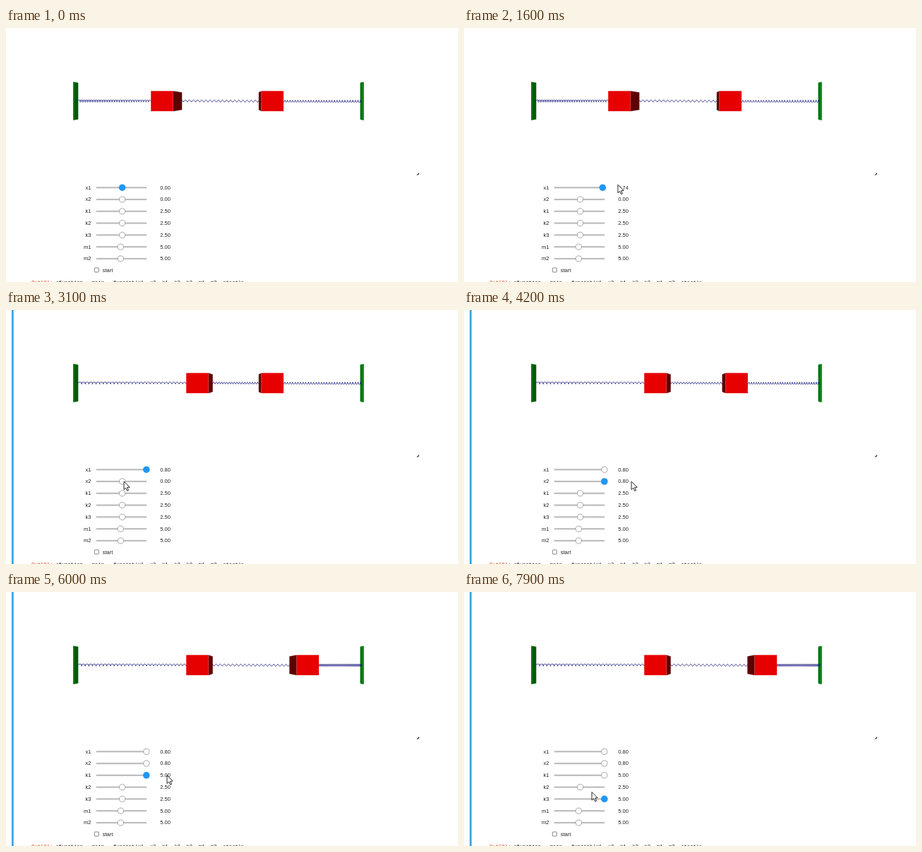
An HTML page with a canvas that plays this animation: 640x360 px, repeating every 8 s.

```html
<!DOCTYPE html>
<html lang="en">
<head>
<meta charset="utf-8">
<title>Coupled oscillator</title>
<style>
html, body { margin: 0; width: 100%; height: 100%; overflow: hidden; background: #fff; }
canvas { display: block; }
</style>
</head>
<body>
<canvas id="stage" width="640" height="360"></canvas>
<script>
const ctx = document.getElementById('stage').getContext('2d');
const LOOP = 8000, STEP = 100;
const AXIS = 103.6, EYE = 333, DEPTH = 0.13;
const MASS_WIDTH = 31.5, TRAVEL = 50;
const SANS = '7.5px "Liberation Sans", Arial, sans-serif';
const MONO = '7.2px "Liberation Mono", "Courier New", monospace';

const sliders = ['x1', 'x2', 'k1', 'k2', 'k3', 'm1', 'm2'].map((label, row) => ({
  label,
  y: 226.2 + row * 16.8,
  home: label[0] === 'm' ? 162.3 : 164.6,
  low: { x: 0, k: 2.5, m: 5 }[label[0]],
  high: label[0] === 'x' ? 0.8 : 5,
}));

// Each drag pulls one slider to its maximum; the pointer ends at `to`.
const drags = [
  { row: 0, arrive: 700, start: 800, end: 1760, to: 222 },
  { row: 1, arrive: 3000, start: 3700, end: 4200, to: 237 },
  { row: 2, arrive: 5050, start: 5400, end: 6000, to: 228 },
  { row: 4, arrive: 6700, start: 6900, end: 7400, to: 222 },
];

const mix = (a, b, u) => a + (b - a) * u;

function ease(t, start, end) {
  const u = Math.min(1, Math.max(0, (t - start) / (end - start)));
  return u * u * (3 - 2 * u);
}

const recede = x => mix(x, EYE, DEPTH);

function poly(color, ...points) {
  ctx.fillStyle = color;
  ctx.beginPath();
  points.forEach(([x, y]) => ctx.lineTo(x, y));
  ctx.closePath();
  ctx.fill();
}

// Vertical face whose two sides may differ in height.
function face(color, x1, h1, x2, h2) {
  poly(color, [x1, AXIS - h1], [x2, AXIS - h2], [x2, AXIS + h2], [x1, AXIS + h1]);
}

function mass(x, inner) {
  const h = 14.3;
  face('#5c0000', inner, h, recede(inner), h * (1 - DEPTH));
  face('#e60000', x, h, x + MASS_WIDTH, h);
}

function spring(from, to, turns) {
  ctx.strokeStyle = '#15157a';
  ctx.lineWidth = 0.8;
  ctx.beginPath();
  const n = turns * 16;
  for (let i = 0; i <= n; i++) {
    const angle = i / 8 * Math.PI;
    const x = mix(from, to, i / n);
    ctx.lineTo(x + (x - EYE) * 0.0075 * Math.sin(angle), AXIS + 1.45 * Math.cos(angle));
  }
  ctx.stroke();
}

function walls() {
  face('#005a0c', 96, 27, 102.3, 26);
  face('#0a7a14', 95, 27, 97, 27);
  face('#006a10', 501.5, 26, 504, 26.7);
  face('#0a8214', 503.5, 27, 506.8, 27);
}

function text(str, x, y, color = '#222', align = 'left') {
  ctx.fillStyle = color;
  ctx.textAlign = align;
  ctx.fillText(str, x, y);
}

function drawSlider({ label, y, home, low, high }, amount, active) {
  text(label, 120.4, y + 2.4, '#222', 'right');
  text(mix(low, high, amount).toFixed(2), 218.2, y + 2.4);
  ctx.fillStyle = '#bdbdbd';
  ctx.fillRect(127.7, y - 1.1, 71.3, 2.2);
  ctx.beginPath();
  ctx.arc(mix(home, 198.8, amount), y, active ? 4.8 : 4.1, 0, 2 * Math.PI);
  ctx.fillStyle = active ? '#2196f3' : '#fff';
  ctx.fill();
  if (!active) {
    ctx.strokeStyle = '#9e9e9e';
    ctx.lineWidth = 0.9;
    ctx.stroke();
  }
}

function controls(t) {
  ctx.font = SANS;
  sliders.forEach((slider, row) => {
    const index = drags.findIndex(d => d.row === row);
    if (index < 0) return drawSlider(slider, 0, false);
    const drag = drags[index], next = drags[index + 1];
    const focused = index === 0 || t >= drag.start - STEP;
    const active = focused && (!next || t < next.start);
    drawSlider(slider, ease(t, drag.start, drag.end), active);
  });

  ctx.strokeStyle = '#777';
  ctx.lineWidth = 0.9;
  ctx.beginPath();
  ctx.roundRect(125.3, 340, 6, 6, 1);
  ctx.stroke();
  text('start', 136.7, 345.8);
}

function pointer(t) {
  if (t < drags[0].arrive) return;
  let x = 167, y = sliders[0].y - 4;
  for (const { row, arrive, start, end, to } of drags) {
    const glide = ease(t, arrive - 500, arrive);
    x = mix(x, 167, glide);
    if (row) y = mix(y, sliders[row].y, glide);
    x = mix(x, to, ease(t, start, end));
  }
  const leave = ease(t, 7500, 7900);
  x = mix(x, 181, leave);
  y = mix(y, 283.5, leave);

  ctx.save();
  ctx.translate(x, y);
  ctx.fillStyle = '#fff';
  ctx.strokeStyle = '#111';
  ctx.lineWidth = 0.9;
  const arrow = new Path2D('M0 0V11.6L2.7 9.2L4.7 13.4L6.5 12.6L4.6 8.5L8.2 8.2Z');
  ctx.fill(arrow);
  ctx.stroke(arrow);
  ctx.restore();
}

function draw(t) {
  ctx.fillStyle = '#fff';
  ctx.fillRect(0, 0, 640, 360);
  if (t >= 1700) {
    ctx.fillStyle = '#42a5e0';
    ctx.fillRect(8, 0, 2.8, 360);
  }

  // The masses follow their sliders with a lag.
  const left = 205.2 - ease(t, 900, 1100) + (TRAVEL + 1) * ease(t, 1600, 2200);
  const right = 361.5 + TRAVEL * ease(t, 3980, 4800);
  const leftInner = left + MASS_WIDTH;
  walls();
  spring(102, left, 30);
  spring(recede(leftInner) - 4, recede(right) + 4, 20);
  spring(right + MASS_WIDTH, 504, 30);
  mass(left, leftInner);
  mass(right, right);

  poly('#333', [585, 205], [585, 207], [583, 208.6], [581.2, 208.6]);
  controls(t);

  ctx.font = MONO;
  text('Out[8]:', 36, 363, '#d84315');
  text('<function __main__.funcint(x1, x2, k1, k2, k3, m1, m2, start)>', 70, 363);
  pointer(t);
}

function frame(now) {
  draw(Math.floor(now % LOOP / STEP) * STEP);
  requestAnimationFrame(frame);
}
requestAnimationFrame(frame);
</script>
</body>
</html>
```
